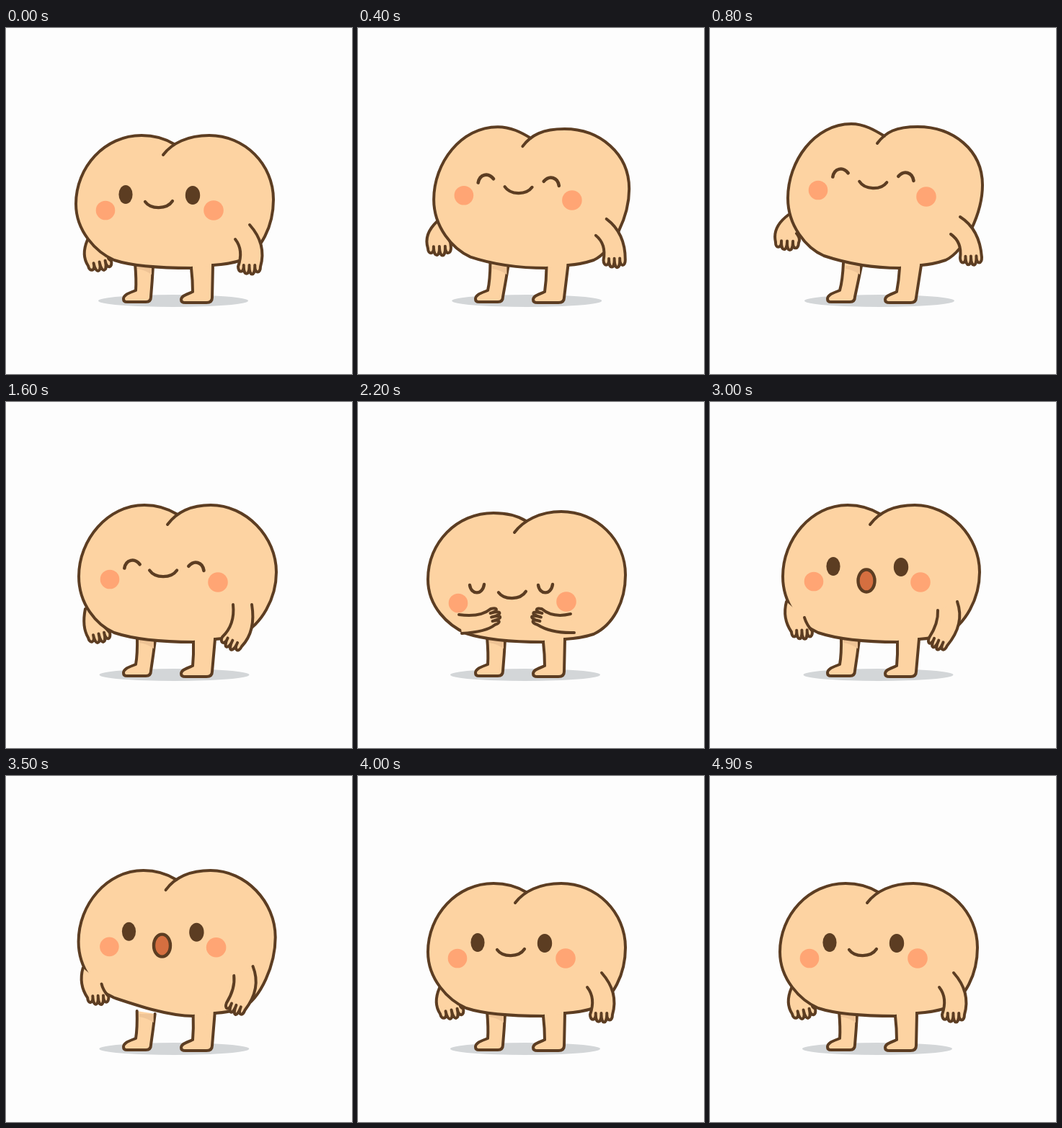
Recreate the animation shown at these times as an HTML page. Size 480 px wide and 480 px high, loop 5000 ms.

```html
<!DOCTYPE html>
<html lang="en">
<head>
<meta charset="utf-8">
<title>Bouncy bean</title>
<style>
html, body { margin: 0; width: 100%; height: 100%; overflow: hidden; background: #fdfdfd; }
svg { display: block; width: 100%; height: 100%; }
</style>
</head>
<body>
<svg id="stage" viewBox="0 0 480 480"></svg>
<script>
const LOOP = 5000, STEP = 100;
const SKIN = '#fdd3a2', LINE = '#5c3d22', CHEEK = '#ffa574';
const stage = document.getElementById('stage');

// body: notch, left top, left side, lower left, right top, right side, crease end
// face: cheeks, eyes, mouth; arms: shoulder, bend, wrist, wrist, bend, shoulder
const poses = {
  idle: {
    body: [233, 161, 188, 149, 97, 244, 150, 322, 282, 149, 371, 238, 218, 176],
    face: [138, 253, 288, 253, 166, 231, 259, 232, 212, 245],
    left: [113, 294, 104, 315, 114, 330, 146, 323, 138, 318, 146, 318],
    right: [318, 293, 330, 308, 322, 331, 353, 331, 362, 300, 338, 273],
    lean: [0]
  },
  happy: {
    body: [242, 150, 196, 133, 108, 236, 158, 316, 288, 137, 378, 218, 232, 160],
    face: [150, 225, 300, 234, 180, 200, 273, 205, 226, 218],
    left: [109, 259, 86, 276, 91, 297, 123, 298, 126, 292, 120, 285],
    right: [334, 286, 350, 297, 347, 319, 377, 318, 374, 279, 347, 262],
    lean: [6]
  },
  soft: {
    body: [238, 156, 192, 143, 101, 242, 150, 320, 284, 143, 375, 236, 224, 170],
    face: [144, 246, 294, 250, 174, 224, 265, 227, 218, 238],
    left: [110, 287, 105, 312, 114, 327, 144, 320, 140, 315, 135, 310],
    right: [315, 281, 318, 309, 300, 326, 327, 339, 347, 318, 341, 281],
    lean: [3]
  },
  hug: {
    body: [233, 165, 188, 154, 97, 246, 150, 321, 282, 152, 371, 240, 217, 181],
    face: [139, 279, 289, 277, 165, 259, 260, 259, 214, 268],
    left: [144, 321, 178, 319, 190, 309, 184, 287, 170, 299, 140, 295],
    right: [295, 294, 270, 300, 255, 287, 249, 309, 268, 321, 300, 320],
    lean: [0]
  },
  gasp: {
    body: [237, 156, 191, 143, 101, 242, 150, 320, 284, 143, 374, 236, 222, 170],
    face: [144, 249, 292, 250, 171, 228, 265, 229, 217, 248],
    left: [106, 277, 100, 300, 113, 319, 142, 318, 134, 309, 131, 299],
    right: [316, 289, 317, 307, 304, 327, 329, 338, 354, 308, 343, 277],
    lean: [3]
  }
};

function shift(pose, dx, dy) {
  const out = { lean: pose.lean };
  for (const part of ['body', 'face', 'left', 'right'])
    out[part] = pose[part].map((v, i) => v + (i % 2 ? dy : dx));
  return out;
}

const { idle, happy, soft, hug, gasp } = poses;
const keys = [
  [0, idle], [600, happy], [900, happy], [1250, shift(happy, -3, -3)],
  [1600, soft], [2100, hug], [2500, hug], [2900, gasp], [3000, gasp],
  [3400, shift(gasp, 0, -14)], [3900, idle], [LOOP, idle]
];

function poseAt(t) {
  const n = keys.findIndex(k => k[0] > t);
  const [t0, a] = keys[n - 1], [t1, b] = keys[n];
  const u = (t - t0) / (t1 - t0), e = u * u * (3 - 2 * u);
  const out = {};
  for (const part in idle) out[part] = a[part].map((v, i) => v + (b[part][i] - v) * e);
  return out;
}

const path = (d, fill = SKIN, width = 4) =>
  `<path d="${d}" fill="${fill}" stroke="${LINE}" stroke-width="${width}" stroke-linecap="round" stroke-linejoin="round"/>`;
const oval = (x, y, rx, ry, fill, extra = '') =>
  `<ellipse cx="${x}" cy="${y}" rx="${rx}" ry="${ry}" fill="${fill}" ${extra}/>`;
const place = (x, y, turn, inner) => `<g transform="translate(${x} ${y}) rotate(${turn})">${inner}</g>`;

function body([ax, ay, ux, uy, lx, ly, bx, by, vx, vy, rx, ry, cx, cy], lean) {
  return path(`M${ax} ${ay}C${ax - 13} ${ay - 8} ${ux + 18} ${uy} ${ux} ${uy}
    C${ux - 51} ${uy} ${lx} ${ly - 51} ${lx} ${ly}
    C${lx} ${ly + 38} ${bx - 25} ${by - 11} ${bx} ${by}
    C${bx + 30} ${by + 10} 225 333 ${257 + lean} 333
    L${287 + lean} 329C${303 + lean} 328 318 325 327 322
    C354 309 ${rx} ${ry + 37} ${rx} ${ry}
    C${rx} ${ry - 49} ${vx + 49} ${vy} ${vx} ${vy}
    C${vx - 30} ${vy} ${cx + 12} ${cy - 16} ${cx} ${cy}`);
}

function arm([ax, ay, bx, by, px, py, qx, qy, cx, cy, dx, dy]) {
  const w = Math.hypot(qx - px, qy - py);
  let nx = (py - qy) / w, ny = (qx - px) / w;
  const away = (px + qx - ax - dx) * nx + (py + qy - ay - dy) * ny;
  if (away < 0) { nx = -nx; ny = -ny; }
  let d = `M${ax} ${ay}Q${bx} ${by} ${px} ${py}`;
  let x = px, y = py;
  [9, 13, 14, 10].forEach((len, i) => {
    const u = (i + 1) / 4, ex = px + (qx - px) * u, ey = py + (qy - py) * u;
    d += `C${x + nx * len} ${y + ny * len} ${ex + nx * len} ${ey + ny * len} ${ex} ${ey}`;
    if (i < 3) d += `l${nx * -2} ${ny * -2}L${ex} ${ey}`;
    x = ex; y = ey;
  });
  return path(d + `Q${cx} ${cy} ${dx} ${dy}`);
}

function backLeg(d) {
  return path(`M${179 + d} 326Q${181 + d / 2} 350 180 364C170 368 163 370 163 376Q163 380 168 380
    L194 380Q201 380 201 373Q${203 + d / 2} 350 ${204 + d} 330`) +
    `<path d="M${182 + d} 330H${202 + d}V342Q${194 + d} 336 ${182 + d} 334Z" fill="#efc496"/>`;
}

function frontLeg(d) {
  return `<path d="M${259 + d} 325H${285 + d}V340H${259 + d}Z" fill="${SKIN}"/>` +
    path(`M${257 + d} 333Q${259 + d / 2} 350 259 366C249 370 243 372 243 377Q243 381 249 381
      L278 381Q286 381 286 374L${287 + d} 329`);
}

function face([ax, ay, bx, by, lx, ly, rx, ry, mx, my], t) {
  const tilt = Math.atan2(by - ay, bx - ax) * 180 / Math.PI;
  let out = oval(ax, ay, 13.3, 13.3, CHEEK) + oval(bx, by, 13.8, 13.8, CHEEK);
  if (t >= 400 && t < 1800) {
    const arc = path('M-11 4C-6 -7 6 -7 11 4', 'none', 4.6);
    out += place(lx, ly, -14, arc) + place(rx, ry, 16, arc);
  } else if (t >= 1800 && t < 2600) {
    const cup = path('M-10 -5C-8 9 8 9 10 -6', 'none', 4.4);
    out += place(lx, ly, 0, cup) + place(rx, ry, 0, cup);
  } else {
    out += oval(lx, ly, 9.6, 13, LINE) + oval(rx, ry, 10.2, 13, LINE);
  }
  if (t >= 2600 && t < 3600)
    out += oval(mx, my, 11.5, 15.5, '#d56f40', `stroke="${LINE}" stroke-width="4.4"`);
  else
    out += place(mx, my, tilt, path('M-19 -4C-11 7 11 7 19 -5', 'none', 4.2));
  return out;
}

function draw(t) {
  const p = poseAt(t), lean = p.lean[0];
  const armInFront = t >= 1800 && t < 3600;
  const left = arm(p.left);
  stage.innerHTML = oval(232 + lean / 2, 378.5, 104, 8.5, '#d3d6d8') +
    backLeg(lean) + (armInFront ? '' : left) + body(p.body, lean) + frontLeg(lean) +
    face(p.face, t) + (armInFront ? left : '') + arm(p.right);
}

const start = performance.now();
function tick() {
  const t = (performance.now() - start) % LOOP;
  draw(Math.floor(t / STEP) * STEP);
  requestAnimationFrame(tick);
}
tick();
</script>
</body>
</html>
```
